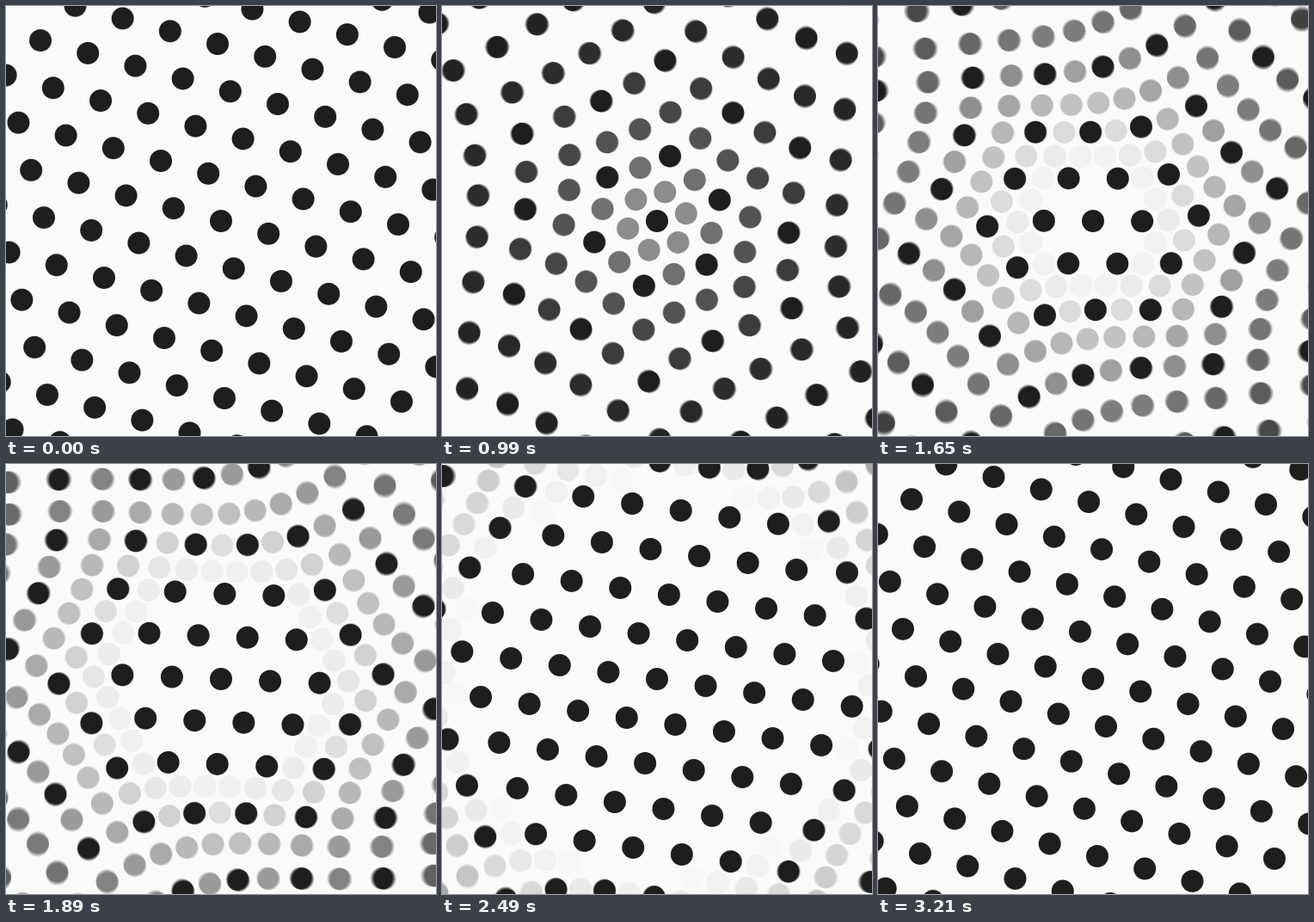
Recreate the animation shown at these times as an HTML page with a canvas. Size 500 by 500 pixels, loop 3.24 s.

```html
<!DOCTYPE html>
<html lang="en">
<head>
<meta charset="utf-8">
<title>Folding dot lattice</title>
<style>
html, body { margin: 0; width: 100%; height: 100%; overflow: hidden; background: #fafafa; }
canvas { display: block; width: 500px; height: 500px; }
</style>
</head>
<body>
<canvas id="stage" width="500" height="500"></canvas>
<script>
const ctx = document.getElementById('stage').getContext('2d');
const LOOP = 3240, STEP = 30;
const SPACING = 400 / 7, RADIUS = 13, CENTER = 250, REACH = 760;
const SAMPLES = 5, SHUTTER = 0.6;
const DEG = Math.PI / 180;

// Triangular lattice in polar form; every second row and column survives the fold.
const dots = [];
for (let a = -16; a <= 16; a++) {
  for (let b = -16; b <= 16; b++) {
    const x = SPACING * (a + b / 2), y = SPACING * b * Math.sqrt(3) / 2;
    const r = Math.hypot(x, y);
    if (r < REACH) dots.push({ r, angle: Math.atan2(y, x), stays: a % 2 === 0 && b % 2 === 0 });
  }
}

const clamp = v => Math.min(1, Math.max(0, v));
const smooth = u => u * u * (3 - 2 * u);

function drawSample(t) {
  const spin = (15 + 30 * t) * DEG;
  for (const { r, angle, stays } of dots) {
    const p = smooth(clamp(2.16 * t + 0.079 - 0.00167 * r));
    const alpha = stays ? 1 : 1 - p * p;
    const dist = r * Math.pow(2, -p);
    if (alpha <= 0 || dist > 372) continue;
    const dir = angle + spin + 30 * DEG * p;
    ctx.globalAlpha = alpha / SAMPLES;
    ctx.beginPath();
    ctx.arc(CENTER + dist * Math.cos(dir), CENTER + dist * Math.sin(dir), RADIUS, 0, 2 * Math.PI);
    ctx.fill();
  }
}

// Adding equal shares of several moments gives motion blur.
function draw(step) {
  ctx.clearRect(0, 0, 500, 500);
  ctx.globalCompositeOperation = 'lighter';
  ctx.fillStyle = '#202020';
  for (let k = 0; k < SAMPLES; k++) {
    const shift = SHUTTER * ((k + 0.5) / SAMPLES - 0.5);
    drawSample((step + shift) * STEP / LOOP);
  }
}

let start = null, shown = -1;
function tick(now) {
  if (start === null) start = now;
  const step = Math.floor(((now - start) % LOOP) / STEP);
  if (step !== shown) draw(shown = step);
  requestAnimationFrame(tick);
}
draw(0);
requestAnimationFrame(tick);
</script>
</body>
</html>
```
